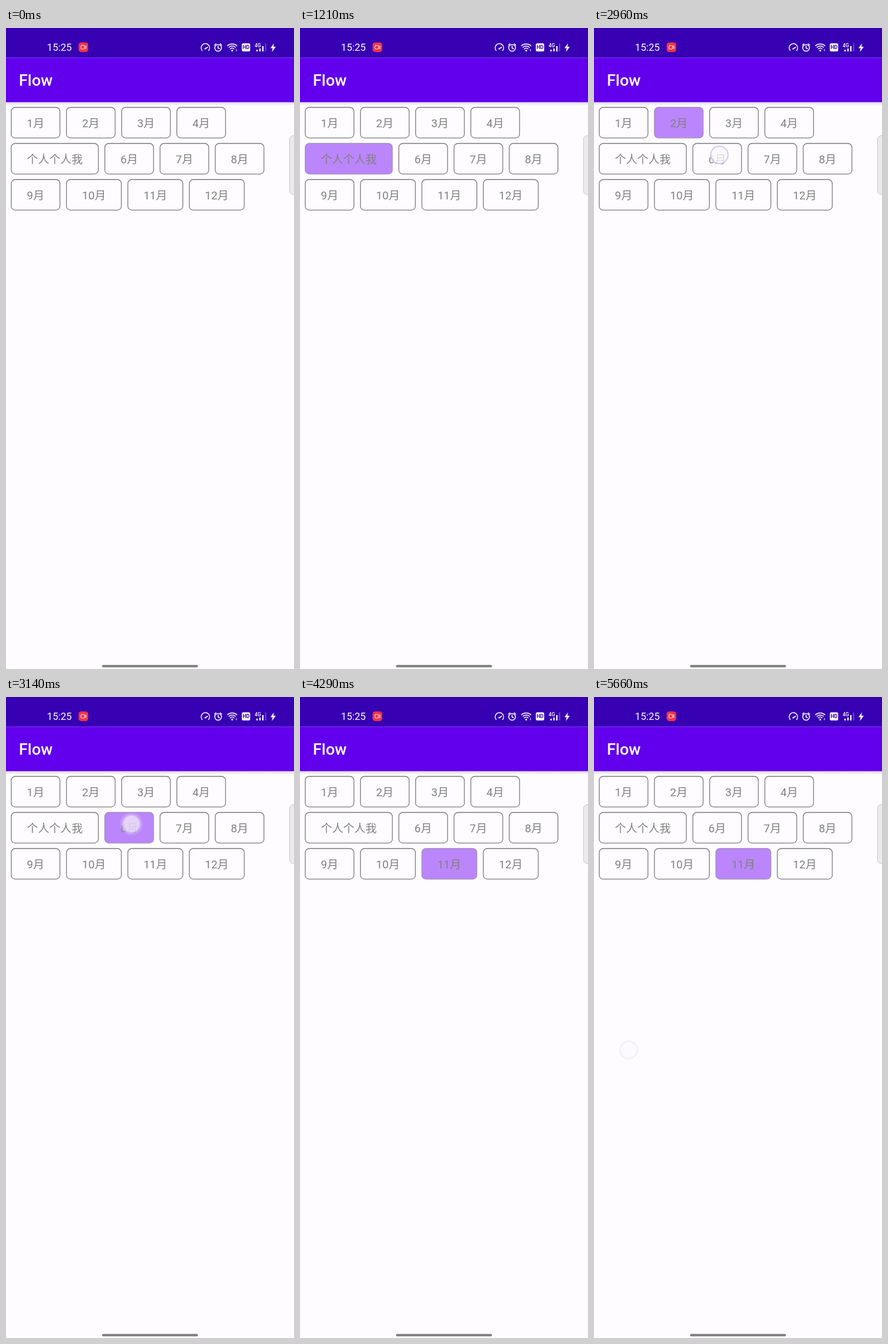
An HTML page with a canvas for the animation above (5720 ms loop, 480 by 1066 pixels).

```html
<!DOCTYPE html>
<html lang="zh-CN">
<head>
<meta charset="utf-8">
<title>Flow</title>
<style>
html, body { margin: 0; width: 100%; height: 100%; overflow: hidden; background: #fefcff; }
canvas { display: block; width: 100vw; height: 100vh; }
</style>
</head>
<body>
<canvas id="stage"></canvas>
<script>
const W = 480, H = 1066, LOOP = 5720;
const canvas = document.getElementById('stage');
const ctx = canvas.getContext('2d');
const dpr = window.devicePixelRatio || 1;
canvas.width = W * dpr;
canvas.height = H * dpr;

const LATIN = 'Roboto, "Noto Sans CJK SC", "Noto Sans CJK JP", "Noto Sans CJK", sans-serif';
const ROWS = [
  ['1月', '2月', '3月', '4月'],
  ['个人个人我', '6月', '7月', '8月'],
  ['9月', '10月', '11月', '12月']
];

// chip: label selected by the tap at time "click"
const TAPS = [
  { x: 121, y: 212, start: 860, end: 1210, chip: '个人个人我', click: 905 },
  { x: 157, y: 153, start: 1810, end: 2070, chip: '2月', click: 1855 },
  { x: 151, y: 153, start: 2280, end: 2460 },
  { x: 209, y: 211, start: 2870, end: 3260, chip: '6月', click: 3010 },
  { x: 265, y: 280, start: 3940, end: 4290, chip: '11月', click: 4045 },
  { x: 61, y: 595, start: 4710, end: 5000 },
  { x: 58, y: 587, start: 5450, end: 5705 }
];

function rect(x, y, w, h, color) {
  ctx.fillStyle = color;
  ctx.fillRect(x, y, w, h);
}

function roundPath(x, y, w, h, r) {
  ctx.beginPath();
  ctx.roundRect(x, y, w, h, r);
}

function text(str, x, y, size, color, weight = 400, align = 'left') {
  ctx.font = `${weight} ${size}px ${LATIN}`;
  ctx.textAlign = align;
  ctx.fillStyle = color;
  ctx.fillText(str, x, y);
}

function line(...pts) {
  ctx.beginPath();
  for (let i = 0; i < pts.length; i += 2) ctx.lineTo(pts[i], pts[i + 1]);
}

function arc(x, y, r, from = 0, to = 360) {
  const rad = Math.PI / 180;
  ctx.beginPath();
  ctx.arc(x, y, r, from * rad, to * rad);
}

function recorderIcon() {
  roundPath(121, 24, 16, 16, 4.5);
  ctx.fillStyle = '#f03346';
  ctx.fill();
  ctx.strokeStyle = '#ffe3e6';
  ctx.lineWidth = 1;
  roundPath(125, 29, 6, 6, 1);
  ctx.stroke();
  line(131, 31.3, 133.3, 29.6, 133.3, 34.4, 131, 32.7);
  ctx.stroke();
}

function statusIcons() {
  ctx.strokeStyle = ctx.fillStyle = '#fff';
  ctx.lineCap = 'round';
  ctx.lineWidth = 1.5;

  // gauge
  arc(332.3, 33, 7, 140, 400);
  ctx.stroke();
  line(332, 34.5, 336, 32);
  ctx.stroke();
  arc(332, 34.5, 1.2);
  ctx.fill();

  // alarm clock
  arc(353.5, 33, 5.6);
  ctx.stroke();
  line(353.5, 30, 353.5, 33.5, 356, 34.5);
  ctx.stroke();
  line(347.5, 28.5, 350, 26.3);
  ctx.stroke();
  line(357, 26.3, 359.5, 28.5);
  ctx.stroke();

  // wifi
  for (const r of [11.6, 8, 4.5]) {
    arc(377, 38, r, 228, 312);
    ctx.stroke();
  }
  arc(377, 37.4, 1.5);
  ctx.fill();
  line(382.8, 36.2, 384, 34.8, 385.2, 36.2);
  ctx.fill();
  line(382.8, 37.3, 384, 38.7, 385.2, 37.3);
  ctx.fill();

  roundPath(393, 25.5, 14, 13.5, 2.5);
  ctx.fill();
  text('HD', 400, 35.4, 8.6, '#3700b3', 700, 'center');

  // mobile signal
  text('4G', 414.5, 32, 8.3, '#fff', 500);
  rect(417.3, 36, 2.2, 3, '#fff');
  rect(422.2, 34, 2.2, 5, '#fff');
  rect(427, 30, 2.2, 9, '#fff');
  rect(431.8, 25.5, 1.8, 13.5, 'rgba(255,255,255,.3)');

  line(446.6, 25.5, 440.8, 33.6, 444.4, 33.6, 443.2, 40, 449.6, 31.2, 445.6, 31.2);
  ctx.fillStyle = '#fff';
  ctx.fill();
}

function header() {
  const shadow = ctx.createLinearGradient(0, 123, 0, 129);
  shadow.addColorStop(0, 'rgba(70,50,110,.2)');
  shadow.addColorStop(1, 'rgba(70,50,110,0)');
  rect(0, 123, W, 6, shadow);
  rect(0, 0, W, 49.3, '#3700b3');
  rect(0, 49.3, W, 74, '#6200ee');
  text('Flow', 21.5, 96.3, 26.6, '#fff', 500);
  text('15:25', 68.3, 38.2, 16.6, '#fff');
  recorderIcon();
  statusIcons();
}

function chip(label, x, y, w, selected) {
  roundPath(x + .7, y + .7, w - 1.4, 50.8, 6.6);
  if (selected) {
    ctx.fillStyle = '#bb86fc';
    ctx.fill();
  }
  ctx.strokeStyle = selected ? '#a08bb8' : '#7d7d7d';
  ctx.lineWidth = 1.3;
  ctx.stroke();
  text(label, x + w / 2, y + 33.6, 18.6, '#808080', 400, 'center');
}

function chips(selected) {
  ROWS.forEach((row, i) => {
    let x = 8;
    for (const label of row) {
      const digits = label.replace(/\D/g, '').length;
      const w = 53.6 + digits * 10.4 + (label.length - digits) * 18.6;
      chip(label, x, 131.3 + i * 60, w, label === selected);
      x += w + 9.4;
    }
  });
}

function touch(tap, time) {
  if (time < tap.start || time >= tap.end) return;
  const { x, y } = tap;
  ctx.globalAlpha = Math.min(1, (tap.end - time) / 140);
  const glow = ctx.createRadialGradient(x, y, 14, x, y, 20);
  glow.addColorStop(0, 'rgba(255,252,255,.4)');
  glow.addColorStop(1, 'rgba(255,252,255,0)');
  arc(x, y, 20);
  ctx.fillStyle = glow;
  ctx.fill();
  arc(x, y, 14.5);
  ctx.fillStyle = 'rgba(250,246,252,.6)';
  ctx.fill();
  ctx.strokeStyle = 'rgba(196,184,228,.75)';
  ctx.lineWidth = 2;
  ctx.stroke();
  ctx.globalAlpha = 1;
}

function edges() {
  roundPath(472.5, 179, 20, 98, 6);
  ctx.fillStyle = '#eceaed';
  ctx.fill();
  ctx.strokeStyle = '#cbc9cc';
  ctx.lineWidth = 1;
  ctx.stroke();
  roundPath(160, 1059.2, 160, 4, 2);
  ctx.fillStyle = '#808080';
  ctx.fill();
}

function draw(time) {
  ctx.setTransform(dpr, 0, 0, dpr, 0, 0);
  rect(0, 0, W, H, '#fefcff');
  header();
  const last = TAPS.filter(tap => tap.chip && time >= tap.click).pop();
  chips(last && last.chip);
  edges();
  TAPS.forEach(tap => touch(tap, time));
}

const begin = performance.now();
function tick() {
  draw((performance.now() - begin) % LOOP);
  requestAnimationFrame(tick);
}
tick();
</script>
</body>
</html>
```
